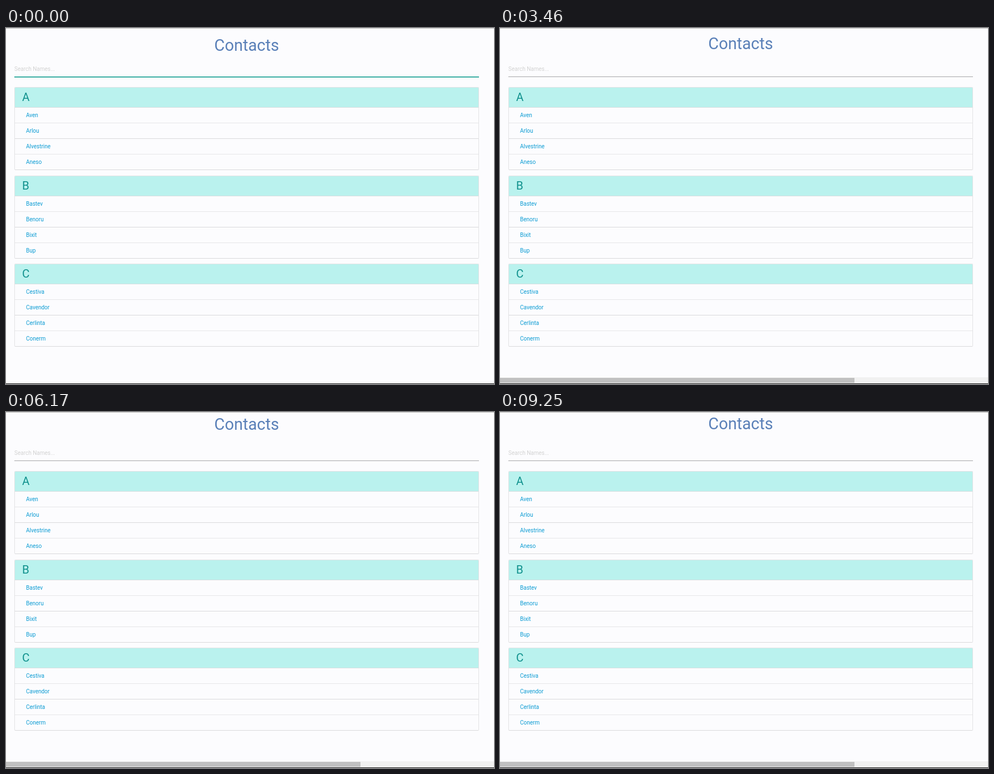
An HTML page that plays this animation: 877x639 px, repeating every 9290 ms.

```html
<!DOCTYPE html>
<html lang="en">
<head>
<meta charset="utf-8">
<title>Contacts</title>
<style>
  html, body { margin: 0; width: 100%; height: 100%; overflow: hidden; }
  body { position: relative; background: #fcfcfe; font: 10px Roboto, sans-serif; }
  body > * { position: absolute; box-sizing: border-box; }

  h1 {
    left: 0; top: 11px; width: 865px; margin: 0;
    font-size: 29px; font-weight: 400; line-height: 40px;
    text-align: center; color: #5a80b8;
  }
  .search {
    left: 15px; top: 60px; width: 835px; height: 28px;
    line-height: 27px; color: #d2d2d2; border-bottom: 1px solid #a6a6a8;
  }
  .idle .search { border-color: #26a69a; box-shadow: 0 1px #4db6ac; }

  .card {
    left: 15px; width: 835px; height: 149px; overflow: hidden;
    border: 1px solid #e2e2e4; border-bottom-color: #d9d9db; border-radius: 2px;
  }
  .card h2 {
    box-sizing: border-box; height: 36px; margin: 0; padding-left: 13px;
    font-size: 20.5px; font-weight: 400; line-height: 35px;
    color: #10918d; background: #baf2ee; border-bottom: 1px solid #d6dedf;
  }
  .card ul { margin: 0; padding: 0; list-style: none; }
  .card li {
    box-sizing: border-box; height: 28px; padding-left: 20px;
    line-height: 27px; color: #0a9bd3; border-bottom: 1px solid #e6e6e8;
  }
  .card li:nth-child(2) { border-color: #d9d9db; }
  .card li:last-child { border: 0; }

  .scroll { left: 0; top: 627px; width: 100%; height: 11px; background: #f1f1f1; }
  .scroll::before {
    content: ""; position: absolute; left: 0; top: 1px;
    width: 637px; height: 9px; background: #c1c1c1;
  }
  .idle .scroll { display: none; }
  .edge { left: 0; width: 100%; height: 1px; }
  .top { top: 0; background: #bdbdbb; }
  .bottom { top: 638px; background: #111; }
  .cursor { left: 0; top: 0; width: 10px; height: 15px; overflow: visible; }
</style>
</head>
<body class="idle">
<h1>Contacts</h1>
<div class="search">Search Names...</div>
<div class="scroll"></div>
<div class="edge top"></div>
<div class="edge bottom"></div>
<svg class="cursor"><path d="M.5 .5V11L3 8.7 4.7 12.6 6.4 11.8 4.8 8.1H8Z" fill="#fff" stroke="#222"/></svg>
<script>
const LOOP = 9290;
// Start of each round in ms, and the speed of its title bounce.
const ROUNDS = [[957, 1.043], [3886, 1], [7044, 1]];
const GROUPS = [
  { letter: 'A', top: 106, names: ['Aven', 'Arlou', 'Alvestrine', 'Aneso'] },
  { letter: 'B', top: 265, names: ['Bastev', 'Benoru', 'Bixit', 'Bup'] },
  { letter: 'C', top: 423, names: ['Cestiva', 'Cavendor', 'Cerlinta', 'Conerm'] }
];
const CURSOR = [
  [0, 385, -16], [957, 385, -16], [1380, 373, 37], [2460, 320, 90], [3000, 290, -16],
  [4700, 225, -16], [5040, 217, 44], [5600, 205, -16], [LOOP, 205, -16]
];

const shift = (x, y = 0) => `translate(${x}, ${y}px)`;

function paused(el, frames, options) {
  const animation = el.animate(frames, { fill: 'both', ...options });
  animation.pause();
  return animation;
}

const fadeFrom = (el, side) => paused(el, [
  { opacity: 0, transform: shift(side * 100 + '%') },
  { opacity: 1, transform: shift('0%') }
], { duration: 1000, easing: 'ease' });

function shake(el) {
  const frames = Array.from({ length: 11 }, (_, i) => {
    const x = i % 10 === 0 ? 0 : i % 2 ? -6.67 : 6.67;
    return { transform: shift(x + 'px'), easing: 'ease' };
  });
  return paused(el, frames, { duration: 1000 });
}

function bounce(el) {
  const land = 'cubic-bezier(.215, .61, .355, 1)';
  const fall = 'cubic-bezier(.755, .05, .855, .06)';
  const steps = [
    [0, 0, land], [.2, 0, land], [.4, -20, fall], [.43, -20, fall], [.53, 0, land],
    [.7, -10, fall], [.8, 0, land], [.9, -2.67, 'ease'], [1, 0, land]
  ];
  return paused(el, steps.map(([offset, y, easing]) =>
    ({ offset, easing, transform: shift('0px', y) })), { duration: 3000 });
}

function addCard({ letter, top, names }) {
  const card = document.createElement('section');
  card.className = 'card';
  card.style.top = top + 'px';
  card.innerHTML = `<h2>${letter}</h2><ul>${names.map(n => `<li>${n}</li>`).join('')}</ul>`;
  document.querySelector('.scroll').before(card);
  return card;
}

const cards = GROUPS.map(addCard);
const entrances = [
  fadeFrom(document.querySelector('.search'), 1),
  fadeFrom(cards[1], 1),
  fadeFrom(cards[2], 1),
  ...cards.map((card, i) => fadeFrom(card.querySelector('h2'), i === 1 ? 1 : -1)),
  shake(cards[0].querySelector('ul'))
];
const title = bounce(document.querySelector('h1'));
const cursor = paused(document.querySelector('.cursor'),
  CURSOR.map(([time, x, y]) => ({ offset: time / LOOP, transform: shift(x + 'px', y) })),
  { duration: LOOP });

function draw() {
  const time = performance.now() % LOOP;
  const round = ROUNDS.filter(([start]) => start <= time).pop();
  const elapsed = round ? time - round[0] : LOOP;
  document.body.classList.toggle('idle', !round);
  for (const animation of entrances) animation.currentTime = Math.min(elapsed, 1000);
  title.currentTime = Math.min(elapsed * (round ? round[1] : 1), 3000);
  cursor.currentTime = time;
  requestAnimationFrame(draw);
}
draw();
</script>
</body>
</html>
```
